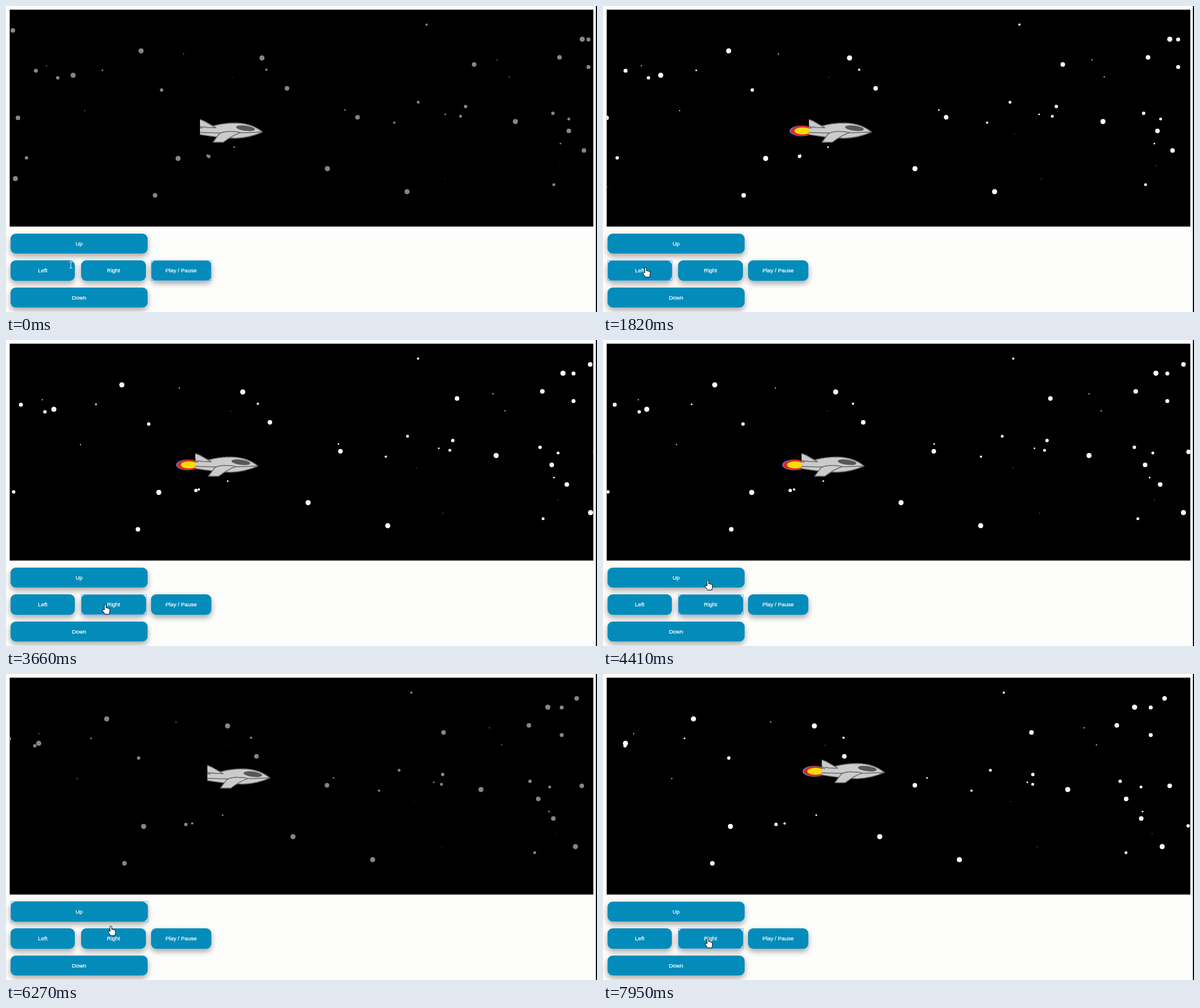
Animation, 1039 px wide and 539 px high, one loop 8000 ms. Source, as an HTML page with a canvas:

```html
<!DOCTYPE html>
<html lang="en">
<head>
<meta charset="utf-8">
<title>Space flight</title>
<style>
html, body { margin: 0; width: 100%; height: 100%; overflow: hidden; background: #fdfdfc; }
#stage { position: relative; width: 1039px; height: 539px; overflow: hidden; }
#stage::after { content: ""; position: absolute; right: 0; top: 0; width: 2px; height: 539px; background: #0a0a0a; }
canvas, #cursor { position: absolute; left: 0; top: 0; }
#cursor { overflow: visible; }
.btn {
  position: absolute; box-sizing: border-box; height: 35.5px; border-radius: 9px;
  background: #038cba; color: #fff; text-align: center;
  font: 9.8px/35.5px "Liberation Sans", Arial, sans-serif;
  -webkit-text-stroke: .25px #fff;
  box-shadow: 0 5px 10px rgba(0,0,0,.2), 0 4px 12px rgba(0,0,0,.19);
}
.focus::before { content: ""; position: absolute; inset: -.5px; border: 1px solid rgba(100,165,235,.8); }
</style>
</head>
<body>
<div id="stage">
  <canvas width="1039" height="539"></canvas>
  <div class="btn" id="up" style="left:8px;top:400.5px;width:241px">Up</div>
  <div class="btn" id="left" style="left:8px;top:448px;width:113px">Left</div>
  <div class="btn" id="right" style="left:132px;top:448px;width:114px">Right</div>
  <div class="btn" id="play" style="left:255px;top:448px;width:105.5px">Play / Pause</div>
  <div class="btn" id="down" style="left:8px;top:495.5px;width:241px">Down</div>
  <svg id="cursor" width="1" height="1">
    <path id="hand" fill="#fff" stroke="#000" stroke-linejoin="round"
      d="M-1.6 10V1.2Q0-.8 1.4 1.2V6.5Q3 5.3 4 7Q5.6 6 6.2 7.8Q7.8 7.2 8 9V12Q7.8 15 6.6 17.5H-.8Q-2.5 14-5 11Q-5.6 8.6-3.5 9.2Z"/>
    <path id="beam" fill="none" stroke="#e4eef2" d="M-2.5 .5H2.5M0 .5V11.5M-2.5 11.5H2.5"/>
  </svg>
</div>
<script>
const $ = id => document.getElementById(id);
const ctx = document.querySelector('canvas').getContext('2d');
const LOOP = 8000, HOLD = 180, SPEED = 1.62, WRAP = 1045;
const SKY = [6.5, 6.5, 1026, 382];

// x, y pairs of the main stars by radius
const bright = {
  3: [91,126.5, 961.5,189, 808,177, 273.5,148, 36,267.5, 356.5,265],
  3.5: [52.5,114, 1024,59, 1024,107.5],
  4: [12,43, 823,103, 973,90.5, 989.5,220, 1016,254.5, 618,196, 494,145, 21,197, 262,333.5],
  4.5: [118,122, 237.5,79, 450,91.5, 1013,58.5, 895.5,203.5, 302.5,268.5, 565,286.5, 16.5,304, 705,327]
};
const stars = [];
for (const r in bright)
  for (let i = 0; i < bright[r].length; i += 2)
    stars.push({ x: bright[r][i], y: bright[r][i + 1], r: +r });

// faint stars are scattered
let seed = 7;
const random = () => (seed = seed * 16807 % 2147483647) / 2147483647;
for (let i = 0; i < 23; i++)
  stars.push({ x: 10 + random() * WRAP, y: 15 + random() * 330, r: 0.5 + i % 5 / 2 });

// each click starts a leg: last tick, heading, focused button
const legs = [
  [18, 1, 0, 'play'], [44, -1, 0, 'left'], [60, 1, 0, 'right'], [90, 0, -1, 'up'], [Infinity, 1, 0, 'right']
];
// pointer stops: arrive, leave, x, y
const stops = [
  [0, 0, 114, 450], [420, 2450, 75, 460], [2860, 3500, 173, 472], [4200, 6000, 184.5, 423], [6550, LOOP, 184.5, 465]
];

// the tick rate rises slowly
function tickAt(t) {
  const s = t / 1000;
  return t < HOLD ? 0 : Math.floor(0.17 + 12.22 * s + 0.187 * s * s);
}

function shipAt(n) {
  let x = 341, y = 0, from = 0;
  for (const [to, dx, dy] of legs) {
    const way = Math.max(0, Math.min(n, to) - from) * SPEED;
    x += dx * way;
    y += dy * way;
    from = to;
  }
  return [x, y];
}

function cursorAt(t) {
  const i = stops.findIndex(s => t <= s[1]);
  const [arrive, , x, y] = stops[i];
  if (t >= arrive) return [x, y];
  const [, leave, px, py] = stops[i - 1];
  const u = (t - leave) / (arrive - leave), e = u * u * (3 - 2 * u);
  return [px + (x - px) * e, py + (y - py) * e];
}

function oval(x, y, rx, ry, fill, turn = 0) {
  ctx.fillStyle = fill;
  ctx.beginPath();
  ctx.ellipse(x, y, rx, ry, turn, 0, 7);
  ctx.fill();
}

function shape(d, fill) {
  const p = new Path2D(d);
  if (fill) { ctx.fillStyle = fill; ctx.fill(p); }
  ctx.stroke(p);
}

function clip(x, y, w, h) {
  ctx.beginPath();
  ctx.rect(x, y, w, h);
  ctx.clip();
}

// bigger stars are nearer and drift faster
function drawStars(n, color) {
  for (const { x, y, r } of stars) {
    const sx = x - n * r * 0.16;
    oval(sx < -3 ? sx + WRAP : sx, y, r, r, color);
  }
}

function drawShip(x, y, flame) {
  ctx.save();
  ctx.translate(x, y);
  if (flame) {
    ctx.save();
    clip(-40, 205, 40.5, 30);
    oval(-13, 220, 21, 9.6, '#5a6fc4');
    oval(-12, 220, 19.5, 9, '#e3261c');
    oval(-11, 220, 14.5, 6.2, '#f6dc0c');
    ctx.restore();
  }
  clip(0, 190, 120, 60);
  ctx.lineJoin = 'round';
  ctx.strokeStyle = '#696969';
  ctx.lineWidth = 1.5;
  shape('M-3 212L24 211Q42 206 64 206Q92 207 110 222Q88 232 62 233Q32 232-3 226Z', '#cbcbcb');
  shape('M-3 222.5Q50 225 110 222');
  shape('M-2 199L8 203L28 214.5L12 214Q4 211-2 217Z', '#cbcbcb');
  shape('M-2 209L5 216');
  shape('M23 240L34 225Q42 220.5 54 221Q65 221 71 223Q57 228 41 240Z', '#cbcbcb');
  oval(80, 215.3, 16.5, 4.6, '#585858', 0.13);
  ctx.restore();
}

function render(t) {
  const n = tickAt(t), lit = n % 2 === 1;
  ctx.clearRect(0, 0, 1039, 539);
  ctx.fillStyle = '#000';
  ctx.fillRect(...SKY);
  ctx.save();
  clip(...SKY);
  drawStars(n, lit ? '#fff' : '#868686');
  drawShip(...shipAt(n), lit);
  ctx.restore();

  const active = legs.find(leg => n < leg[0])[3];
  for (const b of document.querySelectorAll('.btn')) b.classList.toggle('focus', b.id === active);
  const [x, y] = cursorAt(t), text = t < HOLD;
  $('cursor').style.transform = `translate(${x}px, ${y}px)`;
  $('hand').style.display = text ? 'none' : '';
  $('beam').style.display = text ? '' : 'none';
}

let start;
function loop(now) {
  start ??= now;
  render(Math.max(0, now - start) % LOOP);
  requestAnimationFrame(loop);
}
render(0);
requestAnimationFrame(loop);
</script>
</body>
</html>
```
